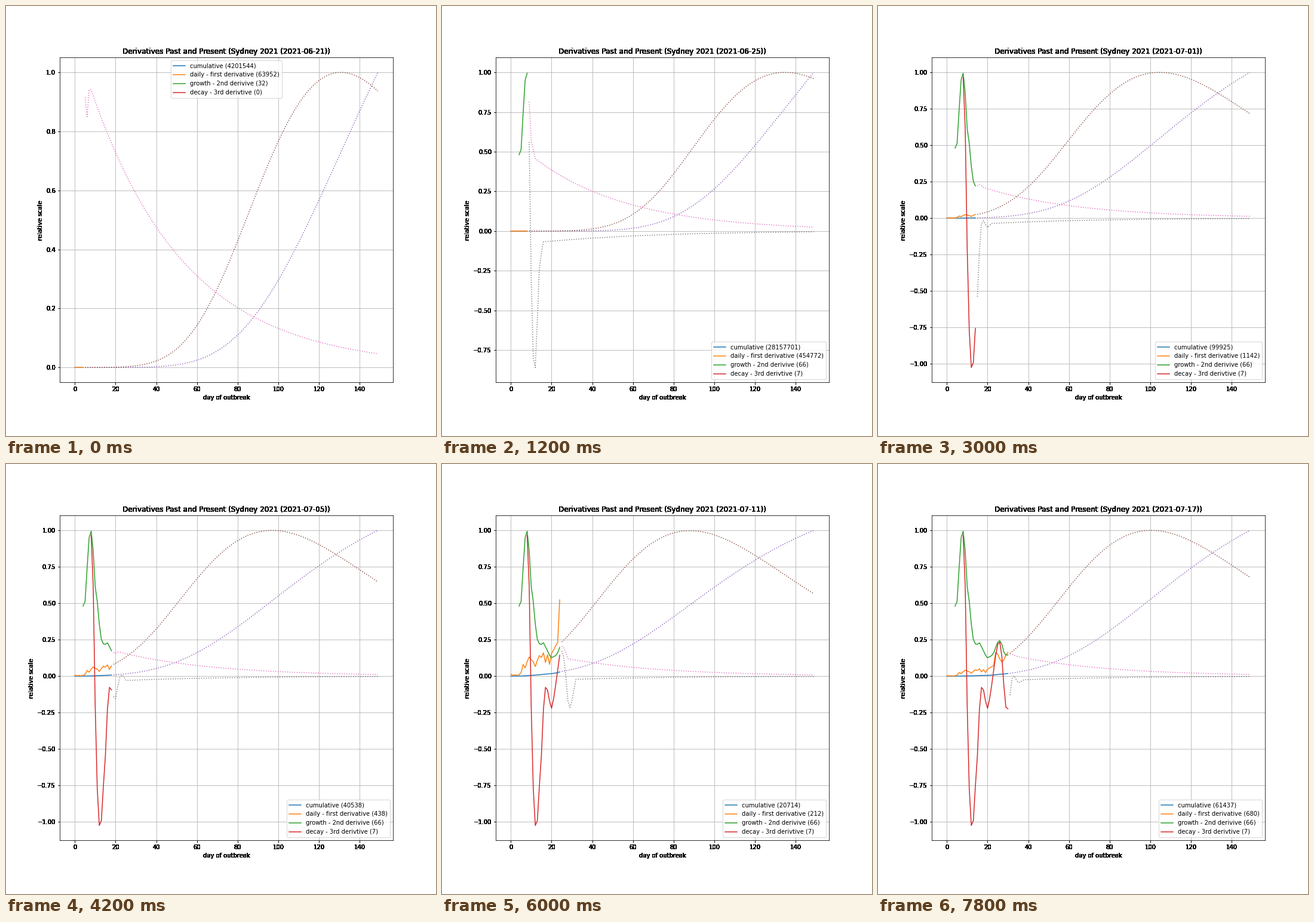
These frames come from a looping animation (720x720 px, 8000 ms). A matplotlib script:

```python
import numpy as np
import matplotlib.pyplot as plt
from matplotlib.animation import FuncAnimation

HORIZON = 150      # days on the chart
DECAY = 0.9789223  # daily factor on the projected growth rate
FIRST_DAY = 4      # last known day when the loop starts
NAMES = ["cumulative", "daily - first derivative",
         "growth - 2nd derivive", "decay - 3rd derivtive"]


def zigzag(count):
    return (-1.0) ** np.arange(count)


def case_counts():
    """Daily cases: a slow start, a surge, a plateau, a climb and a wave."""
    start = 1.5 + zigzag(5) / 2
    start[0] += 1
    surge = [5, 17, 12, 21, 28, 24, 21, 14, 23, 30, 27]
    plateau = np.linspace(28, 23, 4) + 6 * zigzag(4)
    climb = np.linspace(33, 49, 4)
    wave = 89 + 22 * np.cos((np.arange(7) - 0.1) * np.pi / 3)
    return np.round(np.concatenate([start, surge, plateau, climb, wave]))


def rate(values):
    """Daily percentage growth from a five-day log-linear fit."""
    logs = np.log(values)
    out = np.full(len(values), np.nan)
    slope = (2 * (logs[4:] - logs[:-4]) + logs[3:-1] - logs[1:-3]) / 10
    out[4:] = 100 * np.expm1(slope)
    return out


def project(last):
    """The four series, with known days followed by projected ones."""
    known = np.cumsum(CASES[:last + 1])
    base = np.nanmin(rate(known)[-5:]) / 100
    steps = np.arange(1, HORIZON - last)
    future = known[-1] * np.cumprod(1 + base * DECAY ** steps)
    total = np.concatenate([known, future])
    growth = rate(total)
    return total, np.diff(total, prepend=0), growth, rate(1 + growth / 100)


def draw_hard(draw, renderer):
    """Draw repeatedly so that soft edges turn solid."""
    for _ in range(24):
        draw(renderer)


def harden_text(text):
    plain = text.draw
    text.draw = lambda renderer: draw_hard(plain, renderer)


def harden_ticks(axis):
    plain = axis.draw

    def draw(renderer):
        plain(renderer)
        low, high = axis.get_view_interval()
        for tick in axis.get_major_ticks():
            if low <= tick.get_loc() <= high:
                draw_hard(tick.label1.draw, renderer)
                tick.tick1line.draw(renderer)

    axis.draw = draw


CASES = case_counts()
days = np.arange(HORIZON)

fig = plt.figure(figsize=(10, 10), dpi=72, facecolor="white")
fig.subplots_adjust(left=0.125, right=0.9, bottom=0.125, top=0.88)
ax = fig.add_subplot()
ax.grid(True)
ax.set_xlabel("day of outbreak")
ax.set_ylabel("relative scale")
for text in (ax.title, ax.xaxis.label, ax.yaxis.label):
    harden_text(text)
for axis in (ax.xaxis, ax.yaxis):
    harden_ticks(axis)

past = [ax.plot([], [], color=f"C{i}")[0] for i in range(4)]
ahead = [ax.plot([], [], ":", color=f"C{i + 4}")[0] for i in range(4)]


def update(frame):
    last = FIRST_DAY + frame // 3
    split = last + 1
    for name, series, solid, dotted in zip(NAMES, project(last), past, ahead):
        scale = int(round(np.nanmax(series)))
        relative = series / scale if scale else np.full(HORIZON, np.nan)
        solid.set_data(days[:split], relative[:split])
        dotted.set_data(days[split:], relative[split:])
        solid.set_label(f"{name} ({scale})")
    ax.relim()
    ax.autoscale_view()
    ax.legend(loc="upper center" if last == FIRST_DAY else "lower right")
    month, day = (6, 17 + last) if last <= 13 else (7, last - 13)
    ax.set_title("Derivatives Past and Present "
                 f"(Sydney 2021 (2021-{month:02d}-{day:02d}))")
    return past + ahead


anim = FuncAnimation(fig, update, frames=80, interval=100, repeat=True,
                     repeat_delay=0, init_func=lambda: update(0))
plt.show()
```
